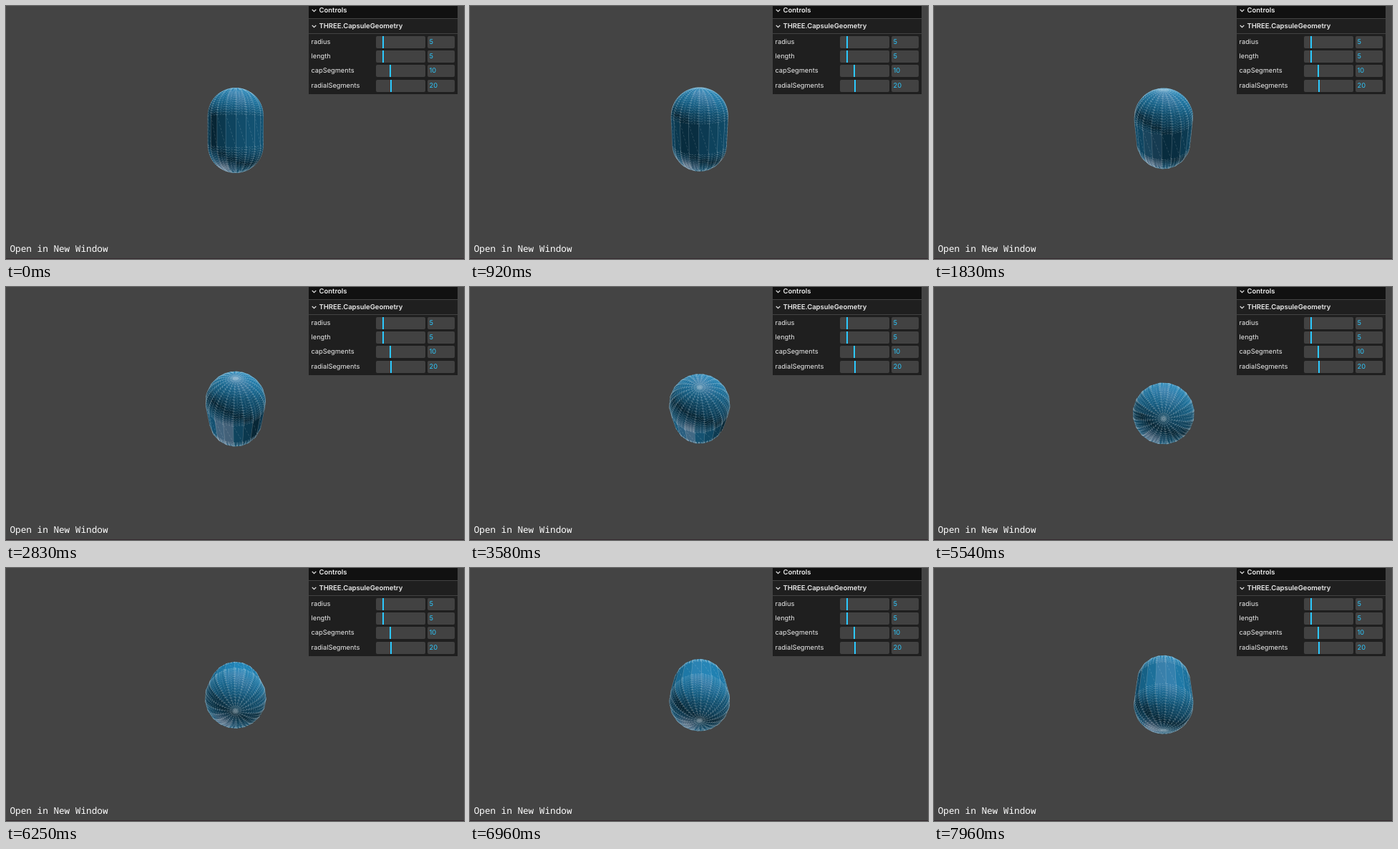
An HTML page with a canvas for the animation above (8000 ms loop, 640 px wide and 353 px high).

```html
<!DOCTYPE html>
<html lang="en">
<head>
<meta charset="utf-8">
<title>Capsule geometry</title>
<style>
  html, body { margin: 0; width: 100%; height: 100%; overflow: hidden; background: #444; }
  .stage { position: relative; width: 640px; height: 353px; overflow: hidden; background: #444;
    text-rendering: geometricPrecision; }
  canvas { position: absolute; left: 0; top: 0; width: 640px; height: 353px; }
  .link { position: absolute; left: 5.5px; top: 329px; color: #fff; white-space: pre;
    font: 12.7px/18px "Noto Sans Mono", "DejaVu Sans Mono", monospace; }
  .edge { position: absolute; left: 0; right: 0; bottom: 0; height: 1.5px; background: #35292f; }
  .panel { position: absolute; left: 423px; top: 0; width: 207.5px; height: 123px; overflow: hidden;
    background: #1f1f1f; color: #ebebeb; font: 9.25px/17px Inter, Roboto, sans-serif; }
  .panel * { position: absolute; }
  .title { left: 0; width: 208px; font-weight: 600; font-size: 9.5px; }
  .title span { left: 14.5px; white-space: pre; }
  .title svg { left: 3.5px; width: 7px; height: 5px; fill: none; stroke: #ebebeb; stroke-width: 1.2; }
  .root { top: 0; height: 17px; background: #111; }
  .root span { top: -2.5px; }
  .root svg { top: 4px; }
  .folder { top: 17px; height: 20px; border: solid #424242; border-width: 1px 0; }
  .folder span { top: 1.5px; }
  .folder svg { top: 8px; }
  .row { left: 0; width: 208px; height: 17px; }
  .row label { left: 3.5px; }
  .slider, .number { top: 0; height: 17px; border-radius: 2px; background: #424242; }
  .slider { left: 94px; width: 69px; }
  .slider i { top: 0; width: 2px; height: 17px; margin-left: -.8px; background: #2cc9ff; }
  .number { left: 166px; width: 38px; color: #2cc9ff; text-indent: 2.5px; }
</style>
</head>
<body>
<div class="stage">
  <canvas width="1280" height="706"></canvas>
  <div class="link">Open in New Window</div>
  <div class="edge"></div>
  <div class="panel">
    <div class="title root"><svg viewBox="0 0 7 5"><path d="M.7.8 3.5 3.7 6.3.8"/></svg><span>Controls</span></div>
    <div class="title folder"><svg viewBox="0 0 7 5"><path d="M.7.8 3.5 3.7 6.3.8"/></svg><span>THREE.CapsuleGeometry</span></div>
  </div>
</div>
<script>
// Control rows: label, value, maximum (minimum is 1)
const controls = [['radius', 5, 30], ['length', 5, 30], ['capSegments', 10, 32], ['radialSegments', 20, 64]];
const panel = document.querySelector('.panel');
controls.forEach(([label, value, max], i) => {
  const part = 100 * (value - 1) / (max - 1);
  panel.insertAdjacentHTML('beforeend',
    `<div class="row" style="top:${41.5 + 20.4 * i}px"><label>${label}</label>` +
    `<div class="slider"><i style="left:${part}%"></i></div><div class="number">${value}</div></div>`);
});

const LOOP = 8000, RADIUS = 5, HALF = 2.5, CAP_ROWS = 20, SIDES = 20;
const CAMERA = 30, FOCAL = 232, CX = 320.8, CY = 173.6;

const ctx = document.querySelector('canvas').getContext('2d');
ctx.scale(2, 2);
ctx.lineJoin = 'round';

const dot = (a, b) => a[0] * b[0] + a[1] * b[1] + a[2] * b[2];
const sub = (a, b) => a.map((v, i) => v - b[i]);
const add = (a, b) => a.map((v, i) => v + b[i]);
const unit = a => { const n = Math.hypot(...a); return a.map(v => v / n); };
const cross = (a, b) => [a[1] * b[2] - a[2] * b[1], a[2] * b[0] - a[0] * b[2], a[0] * b[1] - a[1] * b[0]];
const toLinear = v => v <= 10.3 ? v / 255 / 12.92 : ((v / 255 + .055) / 1.055) ** 2.4;
const toScreen = v => 255 * (v <= .0031308 ? v * 12.92 : 1.055 * Math.min(v, 1) ** (1 / 2.4) - .055);

const DIFFUSE = [21, 98, 137].map(toLinear);
const EMISSIVE = [7, 37, 52].map(toLinear);
const SPECULAR = toLinear(17), SHININESS = 30, POWER = 3;
const LIGHTS = [[0, 1, 0], [1, 2, 1], [-1, -2, -1]].map(unit);

// Outline from bottom pole to top pole as [distance from axis, height]
const profile = [];
for (const side of [-1, 1])
  for (let i = 0; i <= CAP_ROWS; i++) {
    const angle = (i / CAP_ROWS - (side < 0 ? 1 : 0)) * Math.PI / 2;
    profile.push([RADIUS * Math.cos(angle), RADIUS * Math.sin(angle) + side * HALF]);
  }
const ROWS = profile.length - 1;

function rotate([x, y, z], angle) {
  const c = Math.cos(angle), s = Math.sin(angle);
  const depth = z * c - x * s;
  return [x * c + z * s, y * c - depth * s, y * s + depth * c];
}

function project([x, y, z]) {
  const k = FOCAL / (CAMERA - z);
  return [CX + x * k, CY - y * k];
}

// Blinn-Phong, one colour per face
function shade(normal, view) {
  let diffuse = 0, specular = 0;
  for (const light of LIGHTS) {
    const power = POWER * Math.max(0, dot(normal, light));
    const half = unit(add(light, view));
    const vh = Math.max(0, dot(view, half));
    const fresnel = 2 ** ((-5.55473 * vh - 6.98316) * vh);
    const shine = (SHININESS / 2 + 1) / Math.PI * Math.max(0, dot(normal, half)) ** SHININESS;
    diffuse += power / Math.PI;
    specular += power * .25 * shine * (SPECULAR * (1 - fresnel) + fresnel);
  }
  return `rgb(${DIFFUSE.map((c, i) => Math.round(toScreen(c * diffuse + EMISSIVE[i] + specular)))})`;
}

function trace(path, ...points) {
  points.forEach((p, i) => i ? path.lineTo(...p) : path.moveTo(...p));
}

function strokeWire(path, alpha, dash) {
  ctx.setLineDash(dash);
  ctx.strokeStyle = `rgba(255,255,255,${alpha})`;
  ctx.stroke(path);
}

function draw(time) {
  const angle = .012 + .000305 * time;
  const points = Array.from({ length: SIDES }, (_, i) => {
    const phi = i / SIDES * 2 * Math.PI;
    return profile.map(([r, y]) => rotate([r * Math.sin(phi), y, r * Math.cos(phi)], angle));
  });
  const flat = points.map(line => line.map(project));
  const meridians = new Path2D(), rings = new Path2D(), diagonals = new Path2D();

  ctx.clearRect(0, 0, 640, 353);
  ctx.setLineDash([]);
  ctx.lineWidth = .5;
  for (let i = 0; i < SIDES; i++) {
    const n = (i + 1) % SIDES;
    for (let j = 0; j < ROWS; j++) {
      const [a, b, c, d] = [points[i][j], points[n][j], points[n][j + 1], points[i][j + 1]];
      const middle = add(a, c).map(v => v / 2);
      const normal = unit(cross(sub(c, a), sub(d, b)));
      const view = unit(sub([0, 0, CAMERA], middle));
      if (dot(normal, view) <= 0) continue;

      const [pa, pb, pc, pd] = [flat[i][j], flat[n][j], flat[n][j + 1], flat[i][j + 1]];
      const face = new Path2D();
      trace(face, pa, pb, pc, pd);
      face.closePath();
      ctx.fillStyle = ctx.strokeStyle = shade(normal, view);
      ctx.fill(face);
      ctx.stroke(face);

      // Both sides of each face, so that the silhouette is closed
      trace(meridians, pa, pd);
      trace(meridians, pb, pc);
      trace(rings, pa, pb);
      trace(rings, pd, pc);
      trace(diagonals, pb, pd);
    }
  }
  ctx.lineWidth = .6;
  strokeWire(rings, .26, [2, 1.8]);
  strokeWire(diagonals, .2, [3, 2]);
  strokeWire(meridians, .27, []);
}

const start = performance.now();
function frame() {
  draw((performance.now() - start) % LOOP);
  requestAnimationFrame(frame);
}
frame();
</script>
</body>
</html>
```
